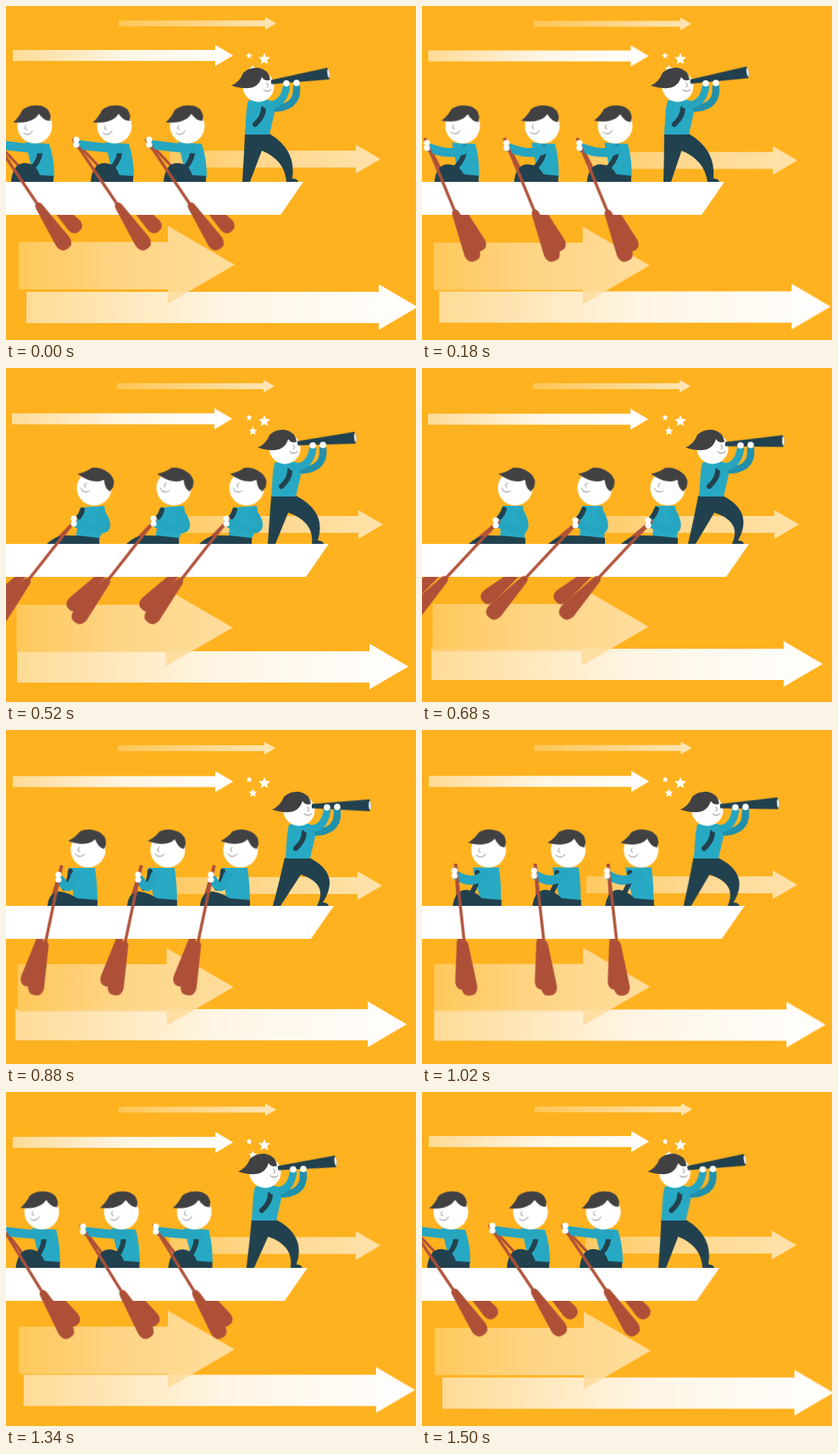
Animation, 484 px wide and 395 px high, one loop 1520 ms. Source, as an HTML page without scripts:

```html
<!DOCTYPE html>
<html lang="en">
<head>
<meta charset="utf-8">
<title>Rowing team</title>
<style>
html, body { margin: 0; width: 100%; height: 100%; overflow: hidden; background: #ffb21f; }
svg { display: block; width: 100%; height: 100%; }

.teal { fill: #27a9c4; }
.navy { fill: #22414e; }
.hair { fill: #414143; }
.oar { fill: #ae5038; }
.line { fill: none; stroke: #8b8b8b; stroke-width: 1; stroke-linecap: round; }
.sleeve { fill: none; stroke: #25a5c0; stroke-width: 10.5; stroke-linecap: round; }
.slim { stroke-width: 8.5; }
.shade { stroke: #2290ab; }
.scarf { fill: none; stroke: #22414e; stroke-width: 6; stroke-linecap: round; }

[class*="go-"] { animation: 1.52s linear infinite; }

/* Arrows */
.go-thin { animation-name: thin; }
@keyframes thin {
  22.4%, 44.7% { transform: translate(-2px, 1px); }
  57.9% { transform: translate(-1px, 1px); }
  77.6% { transform: translate(0, .5px); }
}
.go-upper { animation-name: upper; }
@keyframes upper {
  22.4% { transform: translate(-1px, 1px); }
  44.7% { transform: translate(-1px, 2px); }
  57.9% { transform: translate(0, 2.5px); }
  77.6% { transform: translate(0, 2px); }
}
.go-middle { animation-name: middle; }
@keyframes middle {
  22.4% { transform: translate(2px, 3px); }
  34.2%, 44.7% { transform: translate(3px, 4px); }
  57.9% { transform: translate(2px, 3px); }
  77.6% { transform: translate(0, 1px); }
}
.go-broad { animation-name: broad; }
@keyframes broad {
  22.4% { transform: translate(-2.5px, 1.5px); }
  34.2% { transform: translate(-2.5px, 1px); }
  44.7% { transform: translate(-2.5px, 0); }
  57.9% { transform: translate(-1.5px, -2px); }
  77.6% { transform: translate(0, -3px); }
}
.go-lower { animation-name: lower; }
@keyframes lower {
  22.4% { transform: translate(-7px, -1px); }
  34.2% { transform: translate(-11px, -3px); }
  44.7% { transform: translate(-13px, -6px); }
  57.9% { transform: translate(-13px, -8px); }
  77.6% { transform: translate(-6px, -7px); }
}

/* Boat and lookout */
.go-boat { animation-name: boat; }
@keyframes boat {
  0%, to { transform: none; animation-timing-function: ease-in; }
  22.4% { transform: translate(17px); }
  34.2% { transform: translate(30px); animation-timing-function: ease-out; }
  44.7% { transform: translate(35px); }
  57.9% { transform: translate(36px); animation-timing-function: ease-in; }
  77.6% { transform: translate(14px); animation-timing-function: ease-out; }
}
.go-lookout { animation-name: lookout; }
@keyframes lookout {
  22.4% { transform: translate(-4px); }
  34.2% { transform: translate(1px); }
  44.7% { transform: translate(10px); }
  57.9% { transform: translate(12px); }
  77.6% { transform: translate(6px); }
}
.go-stance { animation-name: stance; }
@keyframes stance {
  0%, to { d: path("M282 151H311Q343 170 338 204Q344 204 345 208H331Q329 182 302 171L288 208H279Q281 178 282 151Z"); }
  22.4% { d: path("M278 151H307Q340 170 338 204Q344 204 345 208H331Q326 182 299 171L288 208H279Q279 178 278 151Z"); }
  34.2% { d: path("M283 151H312Q349 170 338 204Q344 204 345 208H331Q334 182 303 171L288 208H279Q281 178 283 151Z"); }
  44.7% { d: path("M291 151H320Q357 170 338 204Q344 204 345 208H331Q343 182 310 171L288 208H279Q286 178 291 151Z"); }
  57.9% { d: path("M293 151H322Q360 170 338 204Q344 204 345 208H331Q345 182 312 171L288 208H279Q287 178 293 151Z"); }
  77.6% { d: path("M288 151H317Q356 170 338 204Q344 204 345 208H331Q341 182 307 171L288 208H279Q284 178 288 151Z"); }
}
.go-scope { animation-name: scope; }
@keyframes scope {
  0%, to { transform: translate(313px, 90px) rotate(-8.5deg); }
  22.4% { transform: translate(313px, 89px) rotate(-10deg); }
  34.2% { transform: translate(313px, 89px) rotate(-5.5deg); }
  44.7% { transform: translate(313px, 90px) rotate(-3deg); }
  57.9% { transform: translate(313px, 90px) rotate(-.8deg); }
  77.6% { transform: translate(313px, 90px) rotate(-5deg); }
}

/* Rower */
.go-head { animation-name: head; }
@keyframes head {
  0%, to { transform: translate(214px, 142px) rotate(-13deg); animation-timing-function: ease-in; }
  22.4% { transform: translate(254px, 142px) rotate(0deg); }
  34.2% { transform: translate(284px, 142px) rotate(18deg); animation-timing-function: ease-out; }
  44.7% { transform: translate(290px, 142px) rotate(18deg); animation-timing-function: ease-in; }
  57.9% { transform: translate(277px, 142px) rotate(2deg); }
  77.6% { transform: translate(238px, 142px) rotate(-9deg); animation-timing-function: ease-out; }
}
.go-torso { animation-name: torso; }
@keyframes torso {
  0%, to { d: path("M203 161L231 163Q237 180 237 203L213 203Z"); animation-timing-function: ease-in; }
  22.4% { d: path("M238 163L265 163Q268 180 267 203L243 203Z"); }
  34.2% { d: path("M268 165L296 163Q300 180 290 202L262 202Z"); animation-timing-function: ease-out; }
  44.7% { d: path("M275 163L299 163Q303 185 301 202L272 202Z"); animation-timing-function: ease-in; }
  57.9% { d: path("M254 163L285 163Q288 180 288 203L261 203Z"); }
  77.6% { d: path("M224 162L255 162Q257 180 257 203L236 203Z"); animation-timing-function: ease-out; }
}
.go-legs { animation-name: legs; }
@keyframes legs {
  0%, to { d: path("M186 208Q188 184 205 186Q216 187 220 200L236 201L236 208Z"); animation-timing-function: ease-in; }
  22.4% { d: path("M211 208Q213 189 228 190Q240 191 247 197L267 200L267 208Z"); }
  34.2% { d: path("M228 208Q240 197 250 198Q265 198 272 199L290 201L290 208Z"); animation-timing-function: ease-out; }
  44.7% { d: path("M235 208Q248 197 258 198Q272 198 282 199L302 201L302 208Z"); animation-timing-function: ease-in; }
  57.9% { d: path("M229 208Q231 191 244 191Q256 193 264 199L288 201L288 208Z"); }
  77.6% { d: path("M202 208Q206 186 220 187Q230 189 236 199L258 201L258 208Z"); animation-timing-function: ease-out; }
}
.go-scarf { animation-name: scarf; }
@keyframes scarf {
  0%, to { d: path("M220 167Q222 180 211 192"); animation-timing-function: ease-in; }
  22.4% { d: path("M249 167Q248 178 238 188"); }
  34.2% { d: path("M270 168Q268 176 260 182"); animation-timing-function: ease-out; }
  44.7% { d: path("M277 167Q274 176 267 181"); animation-timing-function: ease-in; }
  57.9% { d: path("M256 167Q256 178 249 187"); }
  77.6% { d: path("M233 170Q235 184 229 196"); animation-timing-function: ease-out; }
}
.go-arm { animation-name: arm; }
@keyframes arm {
  0%, to { d: path("M222 169Q200 168 173 164"); animation-timing-function: ease-in; }
  22.4% { d: path("M246 171Q238 196 220 175"); }
  34.2% { d: path("M292 172Q312 202 264 184"); animation-timing-function: ease-out; }
  44.7% { d: path("M296 172Q312 204 271 184"); animation-timing-function: ease-in; }
  57.9% { d: path("M262 172Q255 196 244 177"); }
  77.6% { d: path("M245 169Q222 170 196 167"); animation-timing-function: ease-out; }
}
.go-hands { animation-name: hands; }
@keyframes hands {
  0%, to { transform: translate(169px, 161px); animation-timing-function: ease-in; }
  22.4% { transform: translate(217px, 172px); }
  34.2% { transform: translate(260px, 181px); animation-timing-function: ease-out; }
  44.7% { transform: translate(267px, 183px); animation-timing-function: ease-in; }
  57.9% { transform: translate(242px, 174px); }
  77.6% { transform: translate(192px, 164px); animation-timing-function: ease-out; }
}
.go-near { animation-name: near; }
@keyframes near {
  0%, to { transform: translate(165px, 157px) rotate(-34deg); animation-timing-function: ease-in; }
  22.4% { transform: translate(217px, 155px) rotate(-.7deg); }
  34.2% { transform: translate(264px, 177px) rotate(38deg); animation-timing-function: ease-out; }
  44.7% { transform: translate(272px, 180px) rotate(43deg); animation-timing-function: ease-in; }
  57.9% { transform: translate(246px, 160px) rotate(12deg); }
  77.6% { transform: translate(190px, 156px) rotate(-27deg); animation-timing-function: ease-out; }
}
.go-far { animation-name: far; }
@keyframes far {
  0%, to { transform: translate(165px, 157px) rotate(-43deg); animation-timing-function: ease-in; }
  22.4% { transform: translate(217px, 155px) rotate(3deg); }
  34.2% { transform: translate(264px, 178px) rotate(44deg); animation-timing-function: ease-out; }
  44.7% { transform: translate(272px, 180px) rotate(50deg); animation-timing-function: ease-in; }
  57.9% { transform: translate(246px, 160px) rotate(16.5deg); }
  77.6% { transform: translate(190px, 156px) rotate(-26deg); animation-timing-function: ease-out; }
}
</style>
</head>
<body>
<svg viewBox="0 0 484 395">
  <defs>
    <linearGradient id="faint"><stop stop-color="#ffc655"/><stop offset="1" stop-color="#ffe6b8"/></linearGradient>
    <linearGradient id="soft"><stop stop-color="#ffca62"/><stop offset=".45" stop-color="#ffd88f"/><stop offset="1" stop-color="#ffe2ab"/></linearGradient>
    <linearGradient id="bright"><stop stop-color="#ffdb96"/><stop offset=".5" stop-color="#fff5e3"/><stop offset="1" stop-color="#fff"/></linearGradient>
    <path id="star" fill="#fff" d="M0-7L2-2.3 7-2 3.1 1.4 4.3 6.3 0 3.7-4.3 6.3-3.1 1.4-7-2-2-2.3Z"/>
    <path id="oar" class="oar" d="M-1.7 0H1.7V92Q4 93 4.5 97L9.5 147Q9 157 0 157T-9.5 147L-4.5 97Q-4 93-1.7 92Z"/>
    <use id="far-oar" href="#oar" transform="scale(.95)"/>
    <g id="head">
      <circle r="20.5" fill="#fff"/>
      <path class="hair" d="M-24-10Q-16-14-10-22Q0-27 12-22Q21-18 21-8L19-2Q12-3 8-13Q-2-3-24-10Z"/>
      <path class="line" d="M-10-3q-4 4 0 5M-15 5q5 6 11 0"/>
    </g>
    <g id="hands" fill="#fff"><circle cy="-3" r="3.6"/><circle cy="3" r="3.6"/></g>
  </defs>

  <rect width="484" height="395" fill="#ffb21f"/>

  <path class="go-thin" fill="url(#faint)" d="M133 17H306V13L319 20.5 306 28V24H133Z"/>
  <path class="go-upper" fill="url(#bright)" d="M8 52H247V46L268 58.5 247 71V65H8Z"/>
  <path class="go-middle" fill="url(#soft)" d="M193 171H413V164L442 181 413 198V191H193Z"/>
  <path class="go-lower" fill="url(#bright)" d="M24 338H440V329L486 356 440 383V375H24Z"/>
  <path class="go-broad" fill="url(#soft)" opacity=".9" d="M15 279H191V260L270 306 191 352V335H15Z"/>

  <use href="#star" x="305" y="62.5"/>
  <use href="#star" transform="translate(287 58.5)scale(.55)"/>
  <use href="#star" transform="translate(291.5 74.5)scale(.72)"/>

  <g transform="translate(-180)"><g class="go-far"><use href="#far-oar"/></g></g>
  <g transform="translate(-86)"><g class="go-far"><use href="#far-oar"/></g></g>
  <g class="go-far"><use href="#far-oar"/></g>

  <g class="go-boat">
    <path fill="#fff" d="M-60 208H351L324 247H-60Z"/>
    <path class="navy go-stance"/>
    <g class="go-lookout">
      <path class="sleeve slim shade" d="M312 121Q345 122 343 96"/>
      <path class="teal" d="M286 112Q300 108 313 112L317 126 311 152H282L284 122Z"/>
      <path class="scarf" d="M304 121Q304 131 294 140"/>
      <path class="sleeve slim" d="M307 117Q327 119 331 96"/>
      <circle cx="298" cy="95" r="18.5" fill="#fff"/>
      <path class="hair" d="M266 94Q276 90 280 79Q287 72 298 73Q310 75 312 87Q306 90 302 84Q296 104 266 94Z"/>
      <path class="line" d="M308 91q3 4 0 5M304 99q4 4 9 0"/>
      <g class="go-scope">
        <path class="navy" d="M0-2.5L68-7Q72 0 68 7L0 2.5Z"/>
        <ellipse cx="68.5" rx="1.2" ry="5" fill="#fff"/>
      </g>
      <g fill="#fff"><circle cx="331" cy="91.5" r="3.8"/><circle cx="343" cy="91" r="3.8"/></g>
    </g>
  </g>

  <g transform="translate(-180)">
    <path class="teal go-torso"/>
    <path class="scarf go-scarf"/>
    <path class="navy go-legs"/>
    <g class="go-head"><use href="#head"/></g>
    <path class="sleeve go-arm"/>
    <g class="go-near"><use href="#oar"/></g>
    <g class="go-hands"><use href="#hands"/></g>
  </g>
  <g transform="translate(-86)">
    <path class="teal go-torso"/>
    <path class="scarf go-scarf"/>
    <path class="navy go-legs"/>
    <g class="go-head"><use href="#head"/></g>
    <path class="sleeve go-arm"/>
    <g class="go-near"><use href="#oar"/></g>
    <g class="go-hands"><use href="#hands"/></g>
  </g>
  <g>
    <path class="teal go-torso"/>
    <path class="scarf go-scarf"/>
    <path class="navy go-legs"/>
    <g class="go-head"><use href="#head"/></g>
    <path class="sleeve go-arm"/>
    <g class="go-near"><use href="#oar"/></g>
    <g class="go-hands"><use href="#hands"/></g>
  </g>
</svg>
</body>
</html>
```
